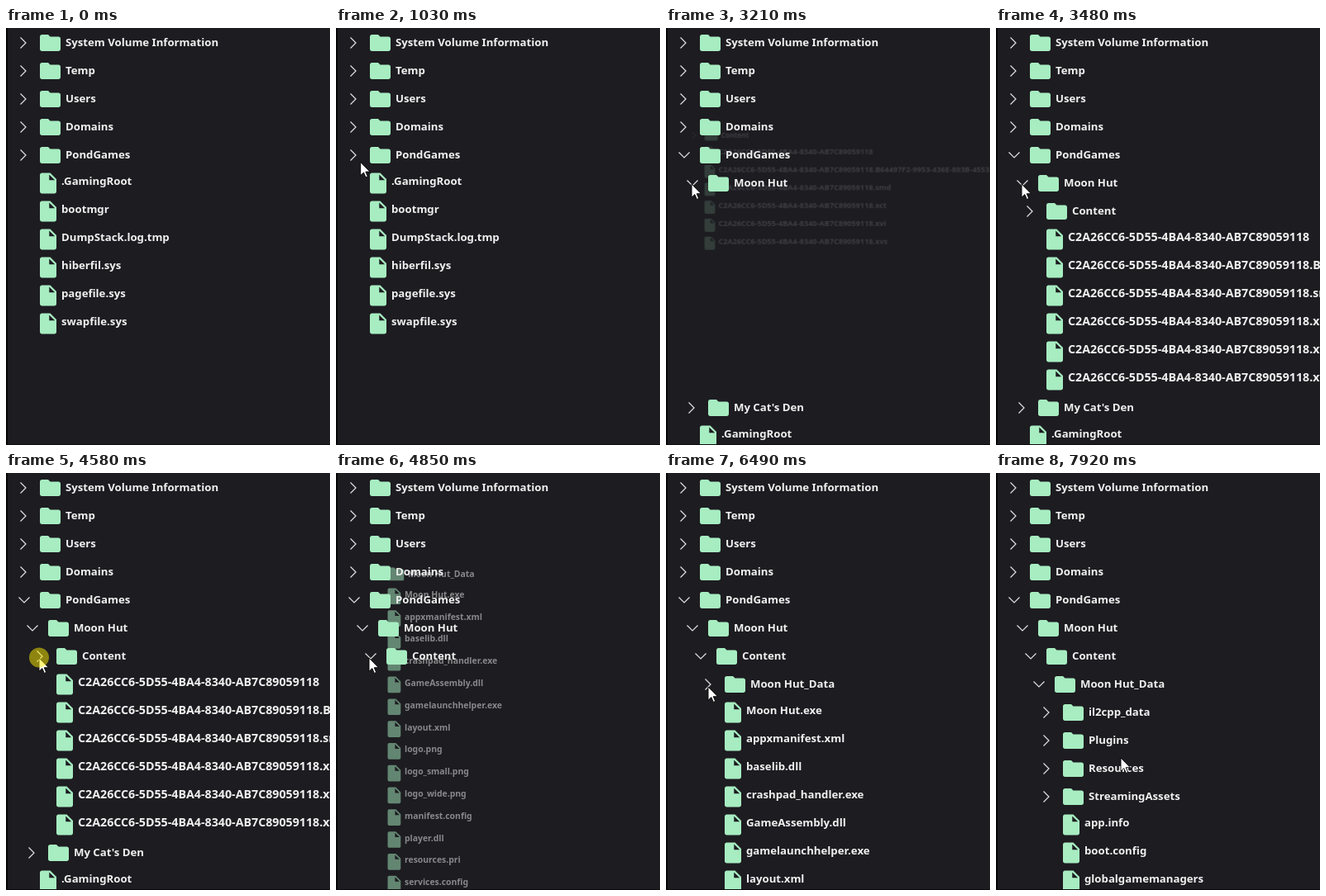
Write an HTML page that moves like this. It is 392 px wide and 505 px high and loops after 7990 ms.

```html
<!DOCTYPE html>
<html lang="en">
<head>
<meta charset="utf-8">
<title>File tree</title>
<style>
  html, body { margin: 0; width: 100%; height: 100%; overflow: hidden; background: #1d1c21; }
  svg { display: block; width: 100vw; height: 100vh; }
  text { font: 700 13.2px "Noto Sans", "Open Sans", sans-serif; fill: #f0f0f0; white-space: pre; }
  text.id { font-size: 14.23px; }
  .icon { fill: #a7edc1; }
  .chevron { fill: none; stroke: #e2e2e2; stroke-width: 1.2; }
</style>
</head>
<body>
<svg id="stage" viewBox="0 0 392 505" preserveAspectRatio="none"></svg>
<script>
const LOOP = 7990, ROW = 34, INDENT = 10;
const FOLDER = "M10 4H4c-1.1 0-2 .9-2 2v12c0 1.1.9 2 2 2h16c1.1 0 2-.9 2-2V8c0-1.1-.9-2-2-2h-8z";
const FILE = "M6 2c-1.1 0-2 .9-2 2v16c0 1.1.9 2 2 2h12c1.1 0 2-.9 2-2V8l-6-6zm7 7V3.5L18.5 9z";
const ARROW = "M0 0V16.2L3.8 12.6L6.3 18.4L8.7 17.4L6.2 11.7H11.4Z";

const folder = (name, kids = [], opens = Infinity, duration = 280) =>
  ({ name, kids, opens, duration, isFolder: true });
const file = name => ({ name, kids: [], opens: Infinity });

const id = "C2A26CC6-5D55-4BA4-8340-AB7C89059118";
const data = folder("Moon Hut_Data", [
  ...["il2cpp_data", "Plugins", "Resources", "StreamingAssets"].map(n => folder(n)),
  ...["app.info", "boot.config", "globalgamemanagers"].map(file)
], 7160, 1);
const content = folder("Content", [
  data,
  ...["Moon Hut.exe", "appxmanifest.xml", "baselib.dll", "crashpad_handler.exe",
    "GameAssembly.dll", "gamelaunchhelper.exe", "layout.xml", "logo.png", "logo_small.png",
    "logo_wide.png", "manifest.config", "player.dll", "resources.pri", "services.config",
    "splash.png", "store_logo.png", "update.dll"].map(file)
], 4710);
const game = folder("Moon Hut", [
  content,
  ...["", ".B64497F2-9953-436E-803B-4553A1C07D26", ".smd", ".xct", ".xvi", ".xvs"]
    .map(ext => file(id + ext))
], 3131);
const roots = [
  ...["System Volume Information", "Temp", "Users", "Domains"].map(n => folder(n)),
  folder("PondGames", [game, folder("My Cat's Den")], 1440),
  ...[".GamingRoot", "bootmgr", "DumpStack.log.tmp", "hiberfil.sys", "pagefile.sys", "swapfile.sys"].map(file)
];

// Cursor stops: time, x, y
const path = [
  [330, 360, 482], [1100, 22, 155], [1760, 22, 155], [1990, 50, 196], [2160, 50, 196],
  [2470, 36, 195], [2700, 36, 195], [2810, 31, 189], [3480, 31, 189], [3830, 42, 213],
  [3870, 42, 213], [3970, 42, 225], [4090, 42, 225], [4180, 40, 224], [5080, 40, 224],
  [5260, 76, 234], [5400, 88, 246], [5650, 66, 265], [5880, 51, 259], [7160, 51, 259],
  [7550, 262, 400], [7920, 151, 345]
];
const clicks = [[1300, 1440], [3080, 3131], [4380, 4710], [6420, 6490]];

const stage = document.getElementById("stage");
function add(parent, tag, attrs = {}) {
  const el = document.createElementNS("http://www.w3.org/2000/svg", tag);
  for (const key in attrs) el.setAttribute(key, attrs[key]);
  parent.append(el);
  return el;
}

function buildRow(parent, node, depth) {
  const x = depth * INDENT;
  node.row = add(parent, "g");
  if (node.isFolder) node.chevron = add(node.row, "path", { class: "chevron" });
  add(node.row, "path", {
    class: "icon",
    d: node.isFolder ? FOLDER : FILE,
    transform: `translate(${x + (node.isFolder ? 38.5 : 36)} 3) scale(1.25)`
  });
  const label = add(node.row, "text", {
    x: x + (node.isFolder ? 72 : 67),
    y: node.isFolder ? 22 : 20
  });
  label.textContent = node.name;
  if (node.name.startsWith(id)) label.setAttribute("class", "id");
}

// Child groups go first so that rows of the parent list stay on top.
function build(parent, nodes, depth) {
  for (const node of nodes) {
    if (!node.kids.length) continue;
    node.group = add(parent, "g");
    build(node.group, node.kids, depth + 1);
  }
  for (const node of nodes) buildRow(parent, node, depth);
}

const clamp = v => Math.max(0, Math.min(1, v));
const easeInOut = v => v < 0.5 ? 2 * v * v : 1 - 2 * (1 - v) ** 2;
const smooth = v => v * v * (3 - 2 * v);

function layout(nodes, depth, y, time) {
  const x = depth * INDENT;
  for (const node of nodes) {
    const open = time >= node.opens;
    node.row.setAttribute("transform", `translate(0 ${y})`);
    if (node.chevron) {
      node.chevron.setAttribute("d", open
        ? `M${x + 15.5} 14.5l6.5 6.5l6.5 -6.5`
        : `M${x + 17.5} 11.5l6.5 6.5l-6.5 6.5`);
    }
    y += ROW;
    if (!node.group) continue;
    node.group.setAttribute("display", open ? "inline" : "none");
    if (!open) continue;
    const bottom = layout(node.kids, depth + 1, y, time);
    const p = easeInOut(clamp((time - node.opens) / node.duration));
    const scale = 0.57 + 0.43 * p;
    const originX = x + 11, originY = 2 * y - bottom;
    node.group.setAttribute("transform",
      `translate(${originX * (1 - scale)} ${originY * (1 - scale)}) scale(${scale})`);
    node.group.setAttribute("opacity", p);
    y = bottom;
  }
  return y;
}

function cursorAt(time) {
  const next = path.findIndex(stop => stop[0] > time);
  if (next < 0) return path[path.length - 1].slice(1);
  if (next === 0) return path[0].slice(1);
  const [t0, x0, y0] = path[next - 1], [t1, x1, y1] = path[next];
  const p = smooth((time - t0) / (t1 - t0));
  return [x0 + (x1 - x0) * p, y0 + (y1 - y0) * p];
}

add(stage, "rect", { width: 392, height: 505, fill: "#1d1c21" });
const tree = add(stage, "g");
build(tree, roots, 0);
add(stage, "rect", { width: 2, height: 505, fill: "#050506" });
add(stage, "rect", { y: 504, width: 392, height: 1, fill: "#0c0c0e" });
const cursor = add(stage, "path", { d: ARROW, fill: "#fff", stroke: "#000", "stroke-width": 0.9 });
const halo = add(stage, "circle", { r: 12, fill: "#ffee00", "fill-opacity": 0.5 });

function render(time) {
  layout(roots, 0, 0, time);
  const [x, y] = cursorAt(time);
  cursor.setAttribute("transform", `translate(${x} ${y})`);
  cursor.setAttribute("display", time >= path[0][0] ? "inline" : "none");
  halo.setAttribute("cx", x);
  halo.setAttribute("cy", y - 0.5);
  halo.setAttribute("display", clicks.some(([a, b]) => time >= a && time < b) ? "inline" : "none");
}

const start = performance.now();
function tick() {
  render((performance.now() - start) % LOOP);
  requestAnimationFrame(tick);
}
tick();
</script>
</body>
</html>
```
